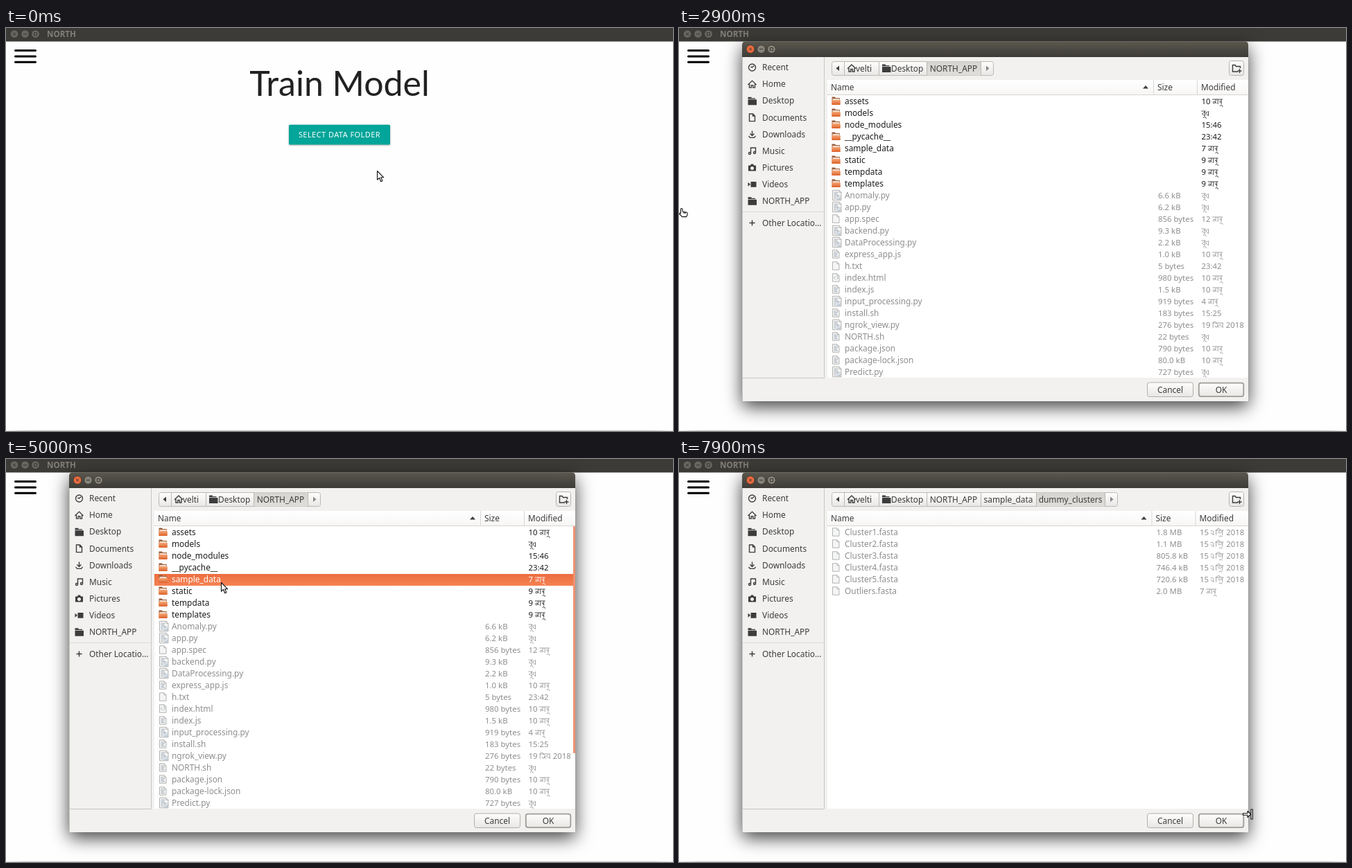
These frames come from a looping animation (962 px wide and 582 px high, 8000 ms). An HTML page:

```html
<!DOCTYPE html>
<html lang="en">
<head>
<meta charset="utf-8">
<title>Train Model</title>
<style>
html, body { margin: 0; width: 100%; height: 100%; overflow: hidden; background: #fefefe; }
svg { display: block; width: 962px; height: 582px; font: 11.9px "Noto Sans", "Open Sans", sans-serif; fill: #3c3c3c; }
.timed { animation: 8s step-end infinite; }
.line { fill: none; stroke: #3c3c3c; stroke-width: 1.4; }
.word { fill: none; stroke: currentColor; stroke-width: .8; }
.num { font-size: 11.4px; }
.pointer { fill: #fff; stroke: #111; stroke-width: 1.1; stroke-linejoin: round; }

#focus { animation-name: focus; }
#dialog { animation-name: dialog; }
#root { animation-name: root; }
#picked { animation-name: picked; }
#scroll { animation-name: scroll; }
#sample { animation-name: sample; }
#clusters { animation-name: clusters; }
#cursor { animation-name: move; }
#arrow { animation-name: arrow; }
#hand { animation-name: hand; }
#resize { animation-name: resize; }
#button { animation-name: hover; filter: drop-shadow(0 1.2px .8px rgba(0,0,0,.24)) drop-shadow(0 .8px 1.4px rgba(0,0,0,.14)); }
#frame > :first-child { filter: drop-shadow(0 8px 13px rgba(0,0,0,.75)); }

@keyframes focus { 0%, 36.25%, 100% { opacity: 0 } 13.75% { opacity: 1 } }
@keyframes dialog { 0% { opacity: 0 } 36.25%, 100% { opacity: 1 } }
@keyframes root { 0% { opacity: 1 } 65%, 100% { opacity: 0 } }
@keyframes picked { 0%, 65%, 100% { opacity: 0 } 60% { opacity: 1 } }
@keyframes scroll { 0%, 65%, 100% { opacity: 0 } 40% { opacity: 1 } }
@keyframes sample { 0%, 82.5%, 100% { opacity: 0 } 65% { opacity: 1 } }
@keyframes clusters { 0% { opacity: 0 } 82.5%, 100% { opacity: 1 } }
@keyframes arrow { 0%, 22.5%, 38.75% { opacity: 1 } 7.5%, 25%, 98.75%, 100% { opacity: 0 } }
@keyframes hand { 0%, 22.5%, 38.75%, 100% { opacity: 0 } 7.5%, 36.25% { opacity: 1 } }
@keyframes resize { 0% { opacity: 0 } 98.75%, 100% { opacity: 1 } }
@keyframes hover {
  0% { fill: #02a599 }
  7.5% { fill: #02a599; animation-timing-function: steps(4, start) }
  12.5%, 100% { fill: #02b9ab }
}
/* Each move advances one step every 100 ms, then rests. */
@keyframes move {
  0% { transform: translate(535px, 206px) }
  1.25% { transform: translate(535px, 206px); animation-timing-function: steps(6, start) }
  8.75% { transform: translate(528px, 164px) }
  22.5% { transform: translate(528px, 164px); animation-timing-function: steps(2, start) }
  25% { transform: translate(233px, 200px) }
  36.25% { transform: translate(4px, 260px) }
  38.75% { transform: translate(4px, 260px); animation-timing-function: steps(3, start) }
  42.5% { transform: translate(430px, 215px) }
  46.25% { transform: translate(430px, 215px); animation-timing-function: steps(2, start) }
  48.75% { transform: translate(321px, 188px) }
  50% { transform: translate(321px, 188px); animation-timing-function: steps(4, start) }
  55% { transform: translate(310px, 178px) }
  67.5% { transform: translate(310px, 178px); animation-timing-function: steps(2, start) }
  70% { transform: translate(222px, 84px) }
  72.5% { transform: translate(318px, 125px) }
  75% { transform: translate(318px, 114px) }
  83.75% { transform: translate(318px, 114px); animation-timing-function: steps(5, start) }
  90% { transform: translate(356px, 246px) }
  91.25% { transform: translate(356px, 246px); animation-timing-function: steps(3, start) }
  95% { transform: translate(816px, 453px) }
  96.25% { transform: translate(848px, 483px) }
  97.5% { transform: translate(842px, 500px) }
  98.75%, 100% { transform: translate(828px, 513px) }
}
</style>
</head>
<body>
<svg viewBox="0 0 962 582">
  <defs>
    <linearGradient id="bar" x2="0" y2="1"><stop stop-color="#5a574e"/><stop offset="1" stop-color="#3d3c37"/></linearGradient>
    <linearGradient id="face" x2="0" y2="1"><stop stop-color="#fdfdfc"/><stop offset="1" stop-color="#e9e7e5"/></linearGradient>
    <linearGradient id="pressed" x2="0" y2="1"><stop stop-color="#d6d4d1"/><stop offset="1" stop-color="#e0dedb"/></linearGradient>
    <linearGradient id="head" x2="0" y2="1"><stop stop-color="#fff"/><stop offset="1" stop-color="#f7f6f5"/></linearGradient>
    <linearGradient id="pick" x2="0" y2="1"><stop stop-color="#ec6d3f"/><stop offset="1" stop-color="#f58253"/></linearGradient>
    <linearGradient id="flap" x2="0" y2="1"><stop stop-color="#f5a878"/><stop offset="1" stop-color="#dd6029"/></linearGradient>
    <linearGradient id="edge"><stop stop-color="#eee"/><stop offset=".03" stop-color="#c4c4c4"/><stop offset=".97" stop-color="#c4c4c4"/><stop offset="1" stop-color="#eee"/></linearGradient>
  </defs>

  <rect width="962" height="582" fill="#fefefe"/>
  <rect y="581" width="962" height="1" fill="url(#edge)"/>
  <g id="idle"></g>
  <g id="focus" class="timed"></g>
  <path d="M13.5 32.5H42.5M13.5 41H42.5M13.5 49.2H42.5" stroke="#000" stroke-width="3" stroke-linecap="round"/>
  <text x="481" y="98" text-anchor="middle" font-size="50" font-family="Lato, sans-serif" fill="#212121">Train Model</text>
  <rect id="button" class="timed" x="408" y="139.8" width="146" height="28.6" rx="1.5"/>
  <text x="481" y="158" text-anchor="middle" font-size="10.9" letter-spacing=".5" fill="#fff">SELECT DATA FOLDER</text>

  <g id="dialog" class="timed">
    <g id="frame"></g>
    <g id="root" class="timed"></g>
    <g id="picked" class="timed"></g>
    <rect id="scroll" class="timed" x="818" y="97" width="3" height="328" rx="1" fill="#ee9472"/>
    <g id="sample" class="timed"></g>
    <g id="clusters" class="timed"></g>
  </g>

  <g id="cursor" class="timed">
    <path id="arrow" class="timed pointer" d="M.5.5V13.2L3.5 10.5L5.7 15.7L7.9 14.7L5.7 9.8H9.7Z"/>
    <path id="hand" class="timed pointer" d="M-1.5 7V1.5Q-.2-.5 1 1.5V5L7 6.3Q8.7 7 8.2 9L6.8 12.6H.5L-3.4 8.5Q-3.4 6.5-1.5 7.8ZM3 5.5V8M5 6V8.3"/>
    <path id="resize" class="timed pointer" d="M-14.5-1.3H-8V-4.5L-3.2 0L-8 4.5V1.3H-14.5ZM-3-7H-.7V7H-3Z"/>
  </g>
</svg>

<script>
const put = (id, ...parts) => document.getElementById(id).innerHTML = parts.flat().join('');
const text = (x, y, s, extra = '') => `<text x="${x}" y="${y}" ${extra}>${s}</text>`;
const rect = (x, y, w, h, fill, extra = '') => `<rect x="${x}" y="${y}" width="${w}" height="${h}" fill="${fill}" ${extra}/>`;
const path = (d, extra = '') => `<path d="${d}" ${extra}/>`;
const at = (x, y, inner) => `<g transform="translate(${x} ${y})">${inner}</g>`;

// Symbolic icons, centred on the origin; "solid" ones are filled.
const icons = {
  clock: ['M5 0A5 5 0 1 1-5 0A5 5 0 1 1 5 0M2.5-2.5L0 0L-2-1'],
  home: ['M-6 .8L0-5L6 .8M-4 0V5H-1.2V1.5H1.2V5H4V0'],
  folder: ['M-6-5.5H-1V-4H4.5V-2.8H-6ZM-6-2H6.5V6H-6Z', 'solid'],
  page: ['M-4-5.3H1L4-2.3V5.3H-4ZM1-5.3V-2.3H4'],
  down: ['M0-5V2M-3-1L0 2L3-1M-5 2.5L-3 5H3L5 2.5'],
  note: ['M-2 3.5a1.5 1.5 0 1 1-3 0a1.5 1.5 0 1 1 3 0V-4.5H5V2.5a1.5 1.5 0 1 1-3 0a1.5 1.5 0 1 1 3 0'],
  camera: ['M-5.5-3H-2.5L-1.5-5H1.5L2.5-3H5.5V5H-5.5ZM0-1.7a2.6 2.6 0 1 0 .01 0Z', 'solid'],
  video: ['M-2-3.8H6V4H-2ZM-2.5 0L-6-3V3Z', 'solid'],
  plus: ['M-4 0H4M0-4V4']
};
const icon = (name, x, y) => {
  const [d, solid] = icons[name];
  return at(x, y, path(d, solid ? 'fill-rule="evenodd"' : 'class="line"'));
};

function titleBar(x, y, w, h, buttonY, active, radius = 0) {
  const bg = active ? 'url(#bar)' : '#3c3b37';
  const ball = (dx, fill, glyph) => at(x + dx, buttonY,
    `<circle r="5.9" fill="${fill}" stroke="#33322e" stroke-width=".8"/>` +
    path(glyph, 'fill="none" stroke="#393833"'));
  const gray = active ? '#858279' : '#67655f';
  return path(`M${x} ${y + h}V${y + radius}q0-${radius} ${radius}-${radius}H${x + w - radius}q${radius} 0 ${radius} ${radius}V${y + h}Z`, `fill="${bg}"`) +
    ball(12, active ? '#ec6b3e' : gray, 'M-2-2L2 2M2-2L-2 2') +
    ball(27.5, gray, 'M-2.5 0H2.5') + ball(42.5, gray, 'M-2-2H2V2H-2Z');
}
const appBar = active => titleBar(0, 0, 962, 19.5, 8.7, active) +
  text(59, 13, 'NORTH', `font-size="11.6" font-weight="700" fill="${active ? '#dfdbd2' : '#827f79'}"`);

// Small Bengali month and weekday words as strokes, from the left of the baseline.
const words = {
  'জানু': [15, 'M0-7H15M5-7V-5Q5-1 2-1Q0-2 2-4Q4-4 6-1M8-7V0M13-7V0M10-4Q13-5 12-2M11 3q1-3 3-1l1 2'],
  'বুধ': [11, 'M0-7H6M5-7V0L1-3L5-6M3 3q0-3 3-1l1 2M10-7V0L7-3Q6-6 9-6'],
  'ডিসে': [16, 'M0-7H16M1-7V0M1-7Q3-11 6-7Q9-5 7-1Q4 0 4-3M9-4Q7-1 10 0M12-6Q9-3 12-3L15-1M15-7V0'],
  'এপ্রি': [19, 'M0-6Q4-8 4-4V0L0-4M7-7H19M8-7V0M8-7Q11-12 15-7M13-6Q10-3 13-3L17-5M17-7V0M12 2q2-2 5 0']
};
function date(x, y, s) {
  return s.split(' ').map(part => {
    const [width, d] = words[part] || [];
    const out = d ? at(x, y, path(d, `class="word" aria-label="${part}"`)) : text(x, y, part, 'class="num"');
    x += d ? width + 3.5 : part.length * 6.5 + 2.7;
    return out;
  }).join('');
}

function fileIcon(name, y) {
  const ext = name.split('.')[1];
  if (!ext) return at(220, y - 6, path('M.5 0H5L6 1.5H12V6H.5Z', 'fill="#9a6140"') +
    rect(1.5, 2.5, 10, 3, '#f3dccb') + rect(.2, 4.5, 12.6, 7, 'url(#flap)', 'rx=".8"'));
  const big = ext === 'py';
  const w = big ? 12.5 : 9.5, h = big ? 14.5 : 11.5;
  const detail = {
    py: 'M2 3H8M2 5.2H7M2 7.4H9M2 9.6H5M2 11.8H5', html: 'M4 4L2 6L4 8M6 4L8 6L6 8',
    spec: '', txt: '', fasta: ''
  }[ext] ?? 'M2 3H5M2 5H7.5M2 7H6M2 9H7.5';
  return at(221.5, y - h / 2,
    path(`M0 0H${w - 3}L${w} 3V${h}H0ZM${w - 3} 0V3H${w}`, 'fill="#f4f5f5" stroke="#ababa9" stroke-width=".9"') +
    path(detail, 'fill="none" stroke="#a1aab4"') +
    (big ? path('M6 8H12V14H6Z', 'fill="#c3ccd5"') + path('M7 12L11 9', 'stroke="#eef1f4" stroke-width="1.4"') : ''));
}

function row(line, i, dx = 0, color) {
  const [name, size, day] = line.split('|');
  const y = 106 + 17 * i;
  const ink = color || (name.includes('.') ? '#8e8e8e' : '#1c1c1c');
  return fileIcon(name, y - .5) + `<g fill="${ink}" color="${ink}">` +
    text(239, y + 4, name) + text(691 + dx, y + 4, size, 'class="num"') + date(753.5 + dx, y + 4, day) + '</g>';
}

function list(lines, dx = 0) {
  const body = lines.trim().split('\n').map((line, i) => row(line.trim(), i, dx));
  return rect(214, 75, 607, 430, '#fff') + rect(214, 75, 607, 21, 'url(#head)') +
    path(`M214 96.5H821M${684.5 + dx} 75V96M${747.5 + dx} 75V96`, 'stroke="#d9d6d3"') +
    text(219, 90, 'Name') + text(690 + dx, 90, 'Size') + text(753 + dx, 90, 'Modified') +
    path(`M${669 + dx} 87.5L${673 + dx} 83L${677 + dx} 87.5Z`) + body.join('');
}

// Folder buttons after the fixed ones: [label, right edge]; the last is the open folder.
function trail(...folders) {
  let x = 357;
  const end = folders.at(-1)[1];
  const cells = folders.map(([label, right], i) => {
    const open = i === folders.length - 1;
    const out = (open ? rect(x, 48.5, right - x, 20, 'url(#pressed)') : '') +
      path(`M${x + .5} 48V69`, 'stroke="#bdb9b4"') +
      text((x + right) / 2, 62.5, label, 'text-anchor="middle"');
    x = right;
    return out;
  });
  return rect(220.5, 48.5, end + 18 - 220, 20, 'url(#face)', 'rx="3" stroke="#bdb9b4"') + cells.join('') +
    path(`M238.5 48V69M288.5 48V69M${end + .5} 48V69`, 'stroke="#bdb9b4"') +
    path('M231 54.5V62L226.5 58.2Z') + path(`M${end + 8} 54.5V62L${end + 12.5} 58.2Z`, 'fill="#888"') +
    icon('home', 249, 58) + text(255, 62.5, 'velti') +
    icon('folder', 299, 58) + text(306, 62.5, 'Desktop');
}

const places = [['clock', 'Recent'], ['home', 'Home'], ['folder', 'Desktop'], ['page', 'Documents'], ['down', 'Downloads'],
  ['note', 'Music'], ['camera', 'Pictures'], ['video', 'Videos'], ['folder', 'NORTH_APP']];
const place = (name, label, y) => icon(name, 105.5, y) + text(120, y + 4.2, label);

put('idle', appBar(false));
put('focus', appBar(true), rect(3, 581, 956, 1, '#8c8c8c'));

put('frame',
  rect(91, 20, 730, 519, '#f2f1f0', 'rx="4"'),
  rect(91, 41, 730, 498, '#f2f1f0'),
  titleBar(91, 19.5, 730, 22.5, 30.5, true, 5),
  path('M91.5 42V539M209.5 42V505.5H92', 'fill="none" stroke="#c9c6c2"'),
  path('M92 265.5H209', 'stroke="#dcdad7"'),
  places.map(([name, label], i) => place(name, label, 57 + 24.1 * i)),
  place('plus', 'Other Locatio…', 281.5),
  rect(793.5, 47.5, 21, 21, 'url(#face)', 'rx="3" stroke="#b8b4af"'),
  path('M806 63H798.5V53.5H802L803.5 55.5H809.5V58M808.5 59V65M805.5 62H811.5', 'class="line"'),
  rect(675.5, 512, 66, 20.5, 'url(#face)', 'rx="3" stroke="#b3afa9"'),
  text(708.5, 526.7, 'Cancel', 'text-anchor="middle"'),
  rect(749.8, 512.6, 64.5, 19.5, 'url(#face)', 'rx="3" stroke="#a09d98" stroke-width="1.8"'),
  text(782, 526.7, 'OK', 'text-anchor="middle"'));

put('root', trail(['NORTH_APP', 435]), list(`
  assets||10 জানু
  models||বুধ
  node_modules||15:46
  __pycache__||23:42
  sample_data||7 জানু
  static||9 জানু
  tempdata||9 জানু
  templates||9 জানু
  Anomaly.py|6.6 kB|বুধ
  app.py|6.2 kB|বুধ
  app.spec|856 bytes|12 জানু
  backend.py|9.3 kB|বুধ
  DataProcessing.py|2.2 kB|বুধ
  express_app.js|1.0 kB|10 জানু
  h.txt|5 bytes|23:42
  index.html|980 bytes|10 জানু
  index.js|1.5 kB|10 জানু
  input_processing.py|919 bytes|4 জানু
  install.sh|183 bytes|15:25
  ngrok_view.py|276 bytes|19 ডিসে 2018
  NORTH.sh|22 bytes|বুধ
  package.json|790 bytes|10 জানু
  package-lock.json|80.0 kB|10 জানু
  Predict.py|727 bytes|বুধ`));

put('picked', rect(214, 166, 607, 17, 'url(#pick)'), row('sample_data||7 জানু', 4, 0, '#fff'));

put('sample', trail(['NORTH_APP', 435], ['sample_data', 515]), list('dummy_clusters||7 জানু'));

put('clusters', trail(['NORTH_APP', 435], ['sample_data', 515], ['dummy_clusters', 614]), list(`
  Cluster1.fasta|1.8 MB|15 এপ্রি 2018
  Cluster2.fasta|1.1 MB|15 এপ্রি 2018
  Cluster3.fasta|805.8 kB|15 এপ্রি 2018
  Cluster4.fasta|746.4 kB|15 এপ্রি 2018
  Cluster5.fasta|720.6 kB|15 এপ্রি 2018
  Outliers.fasta|2.0 MB|7 জানু`, -2.5));
</script>
</body>
</html>
```
